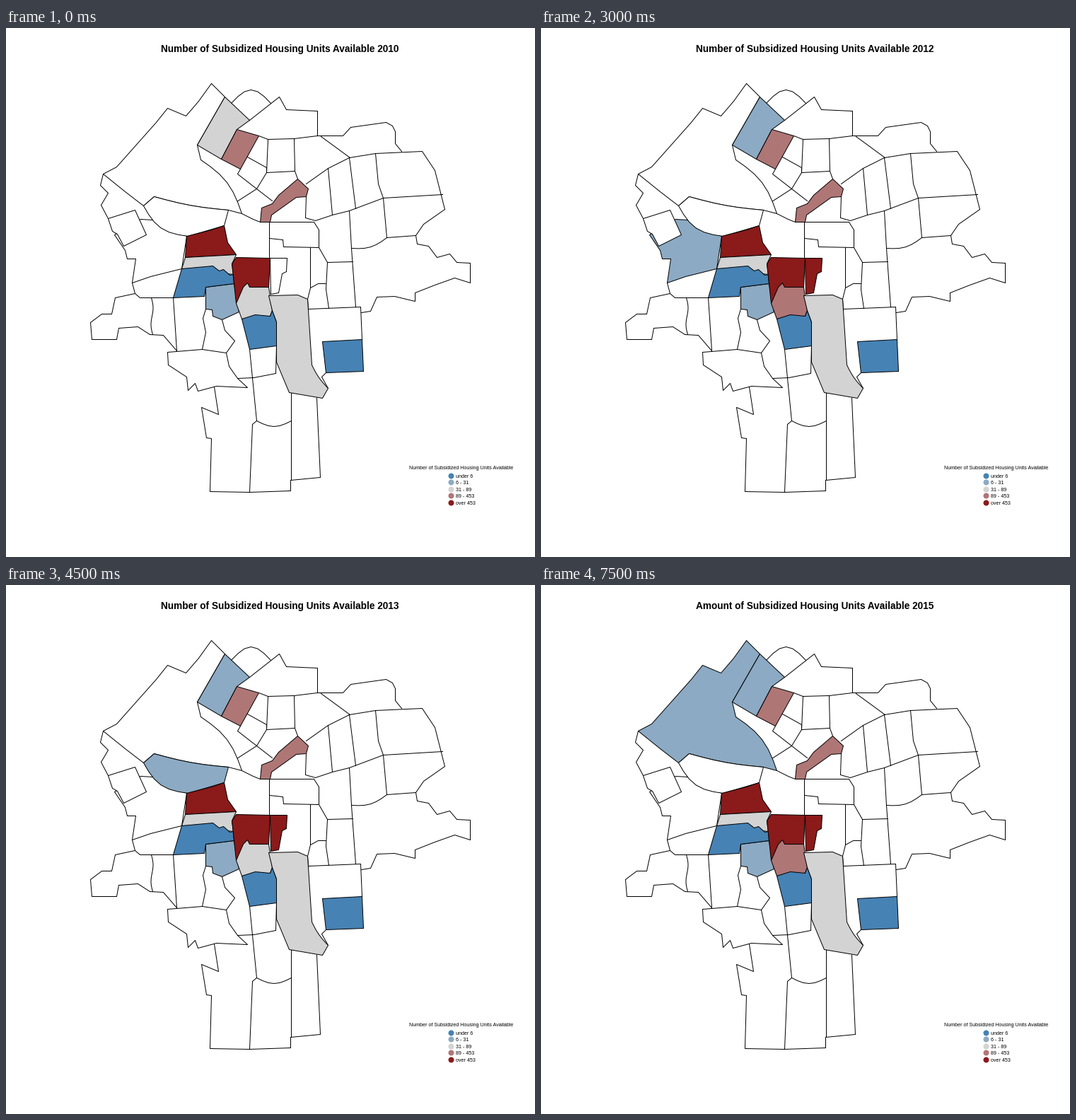
These frames come from a looping animation (748x748 px, 9000 ms). A matplotlib script:

```python
import numpy as np
import matplotlib.pyplot as plt
from matplotlib.animation import FuncAnimation

SIZE, DPI = 748, 88
PX = 72 / DPI  # points per pixel
YEARS = range(2010, 2016)
FILLS = ["white", "#4682B4", "#8CAAC3", "#D3D3D3", "#AF7676", "#8B1A1A"]
LABELS = ["under 6", "6 - 31", "31 - 89", "89 - 453", "over 453"]

plt.rcParams["font.family"] = "Liberation Sans"
fig = plt.figure(figsize=(SIZE / DPI, SIZE / DPI), dpi=DPI, facecolor="white")
ax = fig.add_axes([0, 0, 1, 1])
ax.set_xlim(-0.5, SIZE - 0.5)
ax.set_ylim(SIZE - 0.5, -0.5)
ax.axis("off")

tracts = []


def bend(a, b, h, waves=1):
    """Points from a to b, pushed sideways by a sine of height h."""
    a, b = np.array(a), np.array(b)
    d = b - a
    side = np.array([-d[1], d[0]]) / np.hypot(*d)
    return [tuple(a + t * d + h * np.sin(waves * np.pi * t) * side)
            for t in np.linspace(0, 1, 6 * waves + 1)]


def border(*pts):
    ax.plot(*zip(*pts), color="black", lw=PX, zorder=1,
            solid_joinstyle="round")


def tract(classes, *pts):
    """Opaque area with one class per year; later tracts cover earlier ones."""
    patch = plt.Polygon(pts, ec="black", lw=PX, joinstyle="round", zorder=2)
    ax.add_patch(patch)
    tracts.append((patch, classes))


def label(x, y, text, size, **kw):
    return ax.text(x, y, text, fontsize=size * PX, va="baseline", **kw)


# North
border(*bend((318, 106), (374, 106), -19))
border((344, 130), (386, 97), (396, 115), (440, 117), (440, 152),
       (407, 156), (370, 157), (357, 152))
border((440, 152), (476, 152), (487, 140), (537, 133), (546, 138),
       (550, 146), (550, 163), (559, 174))
border((445, 153), (486, 183))
border((370, 157), (368, 204), (408, 202), (412, 213))
border((407, 156), (408, 202))
border((341, 182), (368, 197), (368, 204), (354, 227), (327, 206), (331, 199))
border((326, 245), (354, 227), (376, 244))
border((333, 262), (349, 270), (359, 274), (435, 274))

# East
border((424, 220), (455, 198), (485, 183), (522, 177), (588, 174), (606, 201),
       (620, 256), (590, 277), (579, 293), (581, 305), (597, 308), (609, 324),
       (627, 319), (637, 331), (656, 332), (656, 360), (634, 353), (606, 363),
       (578, 374), (578, 386), (549, 379), (524, 380), (515, 400), (502, 402))
border((424, 238), (423, 268), (437, 272), (461, 264), (485, 258), (533, 240),
       (617, 235))
border((455, 198), (461, 264))
border((485, 183), (494, 255))
border((522, 177), (526, 220), (533, 240), (538, 296), (579, 293))
border((485, 258), (488, 311), *bend((488, 311), (538, 296), 6))
border((435, 274), (442, 285), (442, 310), (392, 309), (391, 299), (372, 297))
border((372, 274), (372, 325), (397, 325))
border((442, 310), (454, 331), (490, 330))
border((488, 311), (494, 394))
border((454, 331), (452, 369), (456, 396))
border((430, 310), (430, 367), (426, 383), (427, 397), (501, 394), (503, 440))
border((430, 367), (441, 361), (452, 361))
border((452, 487), (446, 493), (455, 509))

# West
border((137, 206), (133, 222), (144, 233), (134, 250), (144, 269))
border((178, 360), (182, 375), (154, 381), (149, 404), (135, 404), (119, 416),
       (121, 440), (156, 440), (159, 424), (186, 422), (203, 433), (222, 434),
       (241, 456))
border((182, 375), (189, 381), (236, 381), (238, 410), (241, 456))
border(*bend((205, 381), (207, 433), -2, 2))

# South
border((282, 397), (278, 410), (282, 430), (277, 454), (311, 459), (323, 442),
       (309, 427), (305, 412))
border((277, 454), (228, 458), (229, 476), (255, 493), (257, 512), (267, 502),
       (271, 513), (297, 506), (341, 508), (327, 495), (315, 478), (311, 459))
border((327, 495), (350, 494), (381, 488), (382, 449))
border((344, 454), (354, 555), *bend((354, 555), (403, 555), 8))
border((294, 507), (300, 546), (276, 536), (283, 579), (290, 580), (288, 655),
       (344, 656), (402, 654), (402, 639), (444, 635), (439, 523))
border((354, 555), (348, 560), (344, 656))
border((403, 515), (403, 639))

# Shaded tracts
river = bend((275, 186), (333, 262), -10)
ridge = bend((209, 238), (314, 257), 3)
tract("000022", (137, 206), (156, 196), (212, 133), (228, 113), (254, 124),
      (272, 103), (290, 78), (309, 97), (270, 165), *river, *ridge[::-1],
      (194, 251), (168, 231))
tract("322222", (309, 97), (344, 130), (326, 143), (304, 185), (270, 165))
tract("444444", (326, 143), (357, 152), (331, 199), (304, 185))
tract("444444", (359, 274), (361, 254), (376, 248), (385, 236), (412, 213),
      (427, 227), (424, 238), (410, 239), (375, 264), (373, 274))
tract("002000", (153, 292), (168, 314), (171, 326), (183, 326), (178, 360),
      (204, 351), (248, 340), (255, 294), (207, 271), (190, 270))
tract("000000", (144, 269), (182, 257), (198, 292), (166, 308), (157, 291),
      (150, 287))
tract("000200", *ridge, (308, 279), *bend((257, 294), (194, 251), -12))
tract("545555", (255, 294), (290, 285), (308, 279), (313, 303), (325, 320),
      (253, 324))
tract("333333", (253, 324), (325, 320), (319, 333), (321, 348), (248, 340))
tract("222222", (282, 366), (322, 361), (329, 401), (305, 412), (292, 407),
      (291, 398), (282, 397))
tract("111111", (248, 340), (292, 336), (301, 343), (307, 341), (316, 349),
      (321, 348), (322, 361), (282, 366), (280, 379), (236, 381))
tract("555555", (319, 333), (325, 324), (373, 325), (371, 366), (325, 389))
tract("005555", (373, 325), (397, 325), (396, 344), (390, 347), (385, 374),
      (374, 376))
tract("344334", (325, 389), (335, 366), (341, 360), (344, 366), (371, 366),
      (376, 399), (373, 407), (333, 411))
tract("111111", (333, 411), (352, 405), (373, 407), (376, 399), (382, 415),
      (382, 449), (344, 454))
tract("333333", (371, 378), (412, 377), (426, 383), (432, 476),
      *bend((432, 476), (455, 509), 2), (447, 523), (400, 515), (382, 472),
      (382, 415), (376, 399))
tract("111111", (447, 443), (503, 440), (505, 485), (452, 487))

# Legend
label(570, 623.5, "Number of Subsidized Housing Units Available", 7.15)
for i, name in enumerate(LABELS):
    y = 632.3 + 9.5 * i
    ax.plot(629, y, "o", ms=8 * PX, color=FILLS[i + 1], mew=0)
    label(636, y + 3, name, 7.15)

title = label(387, 33.5, "", 13.65, ha="center", weight="bold")


def draw(i):
    year = YEARS[i]
    word = "Amount" if year == 2015 else "Number"
    title.set_text(f"{word} of Subsidized Housing Units Available {year}")
    for patch, classes in tracts:
        patch.set_facecolor(FILLS[int(classes[i])])
    return [title] + [patch for patch, _ in tracts]


anim = FuncAnimation(fig, draw, frames=len(YEARS), interval=1500,
                     init_func=lambda: draw(0), repeat=True, repeat_delay=0)
plt.show()
```
